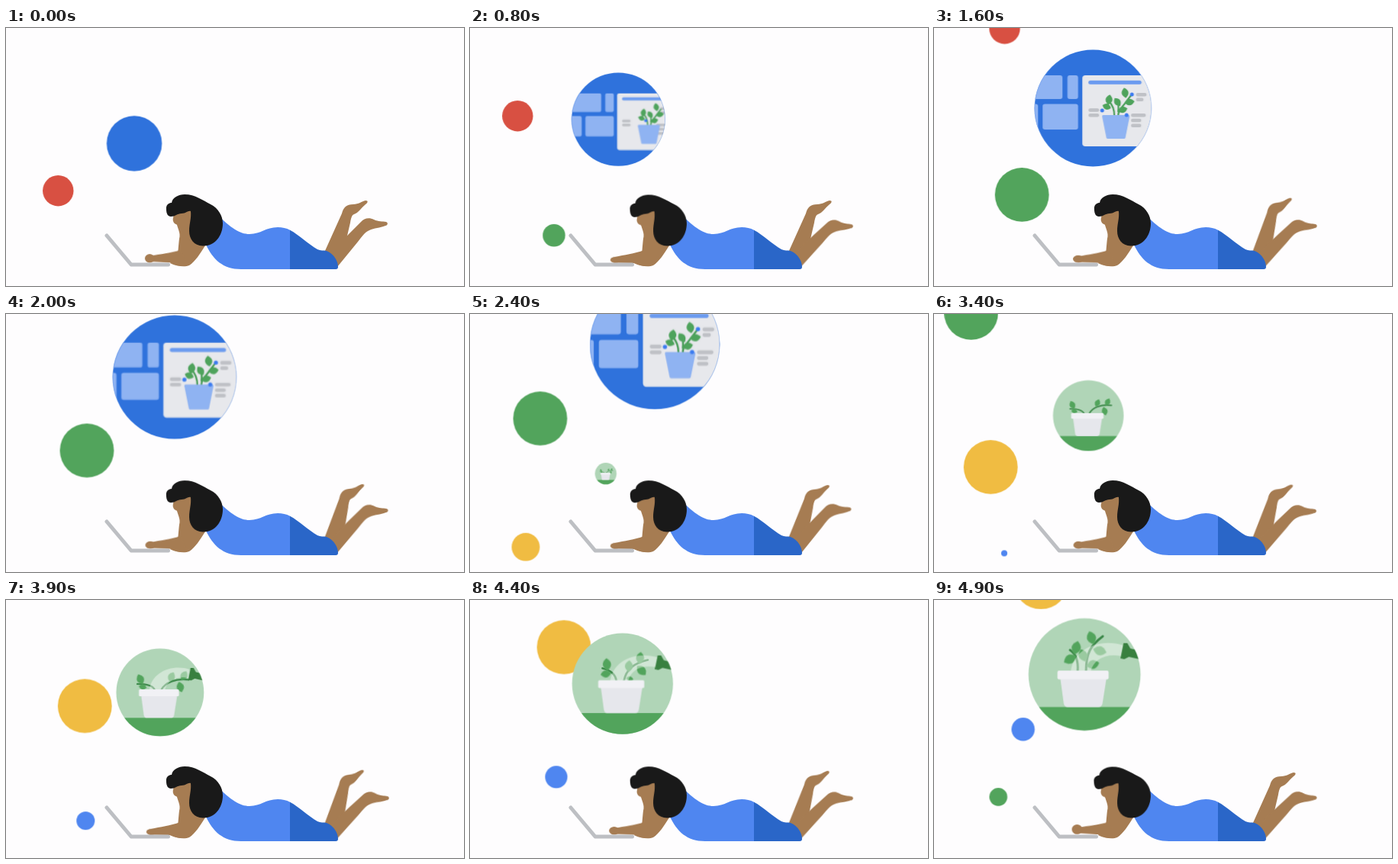
Animation of 600x338 px, one loop 5000 ms. Source, as an HTML page:

```html
<!DOCTYPE html>
<html lang="en">
<head>
<meta charset="utf-8">
<title>Daydreaming at the laptop</title>
<style>
html, body { margin: 0; width: 100%; height: 100%; overflow: hidden; background: #fefdfe; }
svg { display: block; width: 100vw; height: 100vh; }

/* every moving part shares one 5 s clock */
.m { animation: 5s linear infinite; }

/* bubbles: unit circles moved and scaled */
.red { animation-name: red; fill: #d85042; }
.green { animation-name: green; fill: #52a45c; }
.yellow { animation-name: yellow; fill: #f0bc42; }
.blue { animation-name: blue; fill: #4f86f0; }
.last { animation-name: last; fill: #52a45c; }

@keyframes red {
  0% { transform: translate(68.3px, 213.3px) scale(20.2); }
  8% { transform: translate(60.6px, 166px) scale(20.2); }
  12% { transform: translate(59.8px, 141px) scale(20.2); }
  16% { transform: translate(62.3px, 115.4px) scale(20.2); }
  24% { transform: translate(73.8px, 60px) scale(20.2); }
  32% { transform: translate(92.5px, .8px) scale(20.2); }
  36%, 100% { transform: translate(102px, -28px) scale(20.2); }
}
@keyframes green {
  0%, 8% { transform: translate(98px, 288px) scale(0); }
  16% { transform: translate(110px, 271.7px) scale(14.7); }
  24% { transform: translate(117px, 247px) scale(27); }
  32% { transform: translate(115.2px, 218.5px) scale(35.4); }
  40% { transform: translate(106px, 179px) scale(35.4); }
  48% { transform: translate(92px, 137px) scale(35.4); }
  54% { transform: translate(76px, 104px) scale(35.4); }
  60% { transform: translate(61.3px, 67px) scale(35.4); }
  66% { transform: translate(50px, 18px) scale(35.4); }
  72%, 100% { transform: translate(46px, -40px) scale(35.4); }
}
@keyframes yellow {
  0%, 42% { transform: translate(83px, 319px) scale(0); }
  48% { transform: translate(73px, 305.3px) scale(18.4); }
  54% { transform: translate(64px, 279px) scale(29); }
  60% { transform: translate(61.5px, 249px) scale(35.4); }
  66% { transform: translate(69px, 213px) scale(35.4); }
  72% { transform: translate(84.5px, 176px) scale(35.4); }
  78% { transform: translate(103.2px, 139px) scale(35.4); }
  88% { transform: translate(123px, 62px) scale(35.4); }
  98% { transform: translate(140px, -23px) scale(35.4); }
  100% { transform: translate(143px, -41px) scale(35.4); }
}
@keyframes blue {
  0%, 64% { transform: translate(87px, 319px) scale(0); }
  72% { transform: translate(97px, 308px) scale(8); }
  78% { transform: translate(104.3px, 289.3px) scale(12); }
  88% { transform: translate(113px, 232px) scale(14.6); }
  98% { transform: translate(116.7px, 169.5px) scale(15.2); }
  100% { transform: translate(117px, 157px) scale(15.2); }
}
@keyframes last {
  0%, 89% { transform: translate(91px, 274px) scale(0); }
  98% { transform: translate(84.3px, 258px) scale(11.8); }
  100% { transform: translate(83px, 254px) scale(13.5); }
}

/* catalogue bubble */
.shop { animation-name: shop; }
.slide { animation-name: slide; }
.pick { animation-name: pick; }
.dot1 { animation-name: dot1; }
.dot { animation-name: dot; }
@keyframes shop {
  0% { transform: translate(168px, 151.3px) scale(.473); }
  6% { transform: translate(178px, 137px) scale(.62); }
  12% { transform: translate(188px, 124.5px) scale(.745); }
  16% { transform: translate(194.3px, 119.7px) scale(.8); }
  24% { transform: translate(203px, 111px) scale(.925); }
  32% { transform: translate(208.2px, 105px) scale(1); }
  38% { transform: translate(216px, 92px) scale(1.045); }
  43% { transform: translate(228px, 69px) scale(1.08); }
  48% { transform: translate(242px, 40px) scale(1.11); }
  54% { transform: translate(259px, -22px) scale(1.11); }
  60%, 100% { transform: translate(274px, -100px) scale(1.11); }
}
@keyframes slide {
  0%, 3% { transform: translate(45px, 0); opacity: 0; }
  10% { transform: translate(25px, 0); opacity: 1; }
  16% { transform: translate(12px, 0); }
  24% { transform: translate(3px, 0); }
  32%, 100% { transform: translate(0, 0); opacity: 1; }
}
@keyframes pick {
  0%, 8% { transform: translate(24px, 0); }
  16% { transform: translate(8px, 0); }
  24%, 100% { transform: translate(0, 0); }
}
@keyframes dot1 {
  0%, 10% { transform: translate(250px, 107px) scale(0); }
  16% { transform: translate(241px, 107px) scale(1); }
  25%, 100% { transform: translate(220px, 108px) scale(1); }
}
@keyframes dot {
  0%, 18% { transform: var(--at) scale(0); }
  24%, 100% { transform: var(--at) scale(1); }
}

/* watering bubble */
.care { animation-name: care; }
.can { animation-name: can; }
.water { animation-name: water; }
.rise { animation-name: rise; }
.stem1 { animation-name: stem1; }
.stem2 { animation-name: stem2; }
@keyframes care {
  0%, 43% { transform: translate(168px, 228px) scale(0); }
  48% { transform: translate(177.8px, 209.2px) scale(.192); }
  54% { transform: translate(191px, 176px) scale(.34); }
  60% { transform: translate(199.8px, 147.5px) scale(.474); }
  66% { transform: translate(202px, 136px) scale(.59); }
  72% { transform: translate(202.5px, 127px) scale(.71); }
  78% { transform: translate(201.8px, 121px) scale(.782); }
  84% { transform: translate(201px, 114.5px) scale(.855); }
  91% { transform: translate(199px, 106px) scale(.935); }
  98% { transform: translate(197.2px, 97.5px) scale(1); }
  100% { transform: translate(196.5px, 95px) scale(1.01); }
}
@keyframes can {
  0%, 66% { transform: translate(40px, 0); }
  74%, 100% { transform: translate(0, 0); }
}
@keyframes water {
  0%, 73% { opacity: 0; }
  77%, 100% { opacity: .42; }
}
@keyframes rise {
  0%, 81% { transform: var(--a); }
  96%, 100% { transform: var(--b); }
}
@keyframes stem1 {
  0%, 81% { d: path("M-9 -4C-12 -12 -24 -14 -38 -14"); }
  96%, 100% { d: path("M-9 -4C-8 -16 -10 -26 -19 -32"); }
}
@keyframes stem2 {
  0%, 81% { d: path("M2 -4C8 -16 26 -24 48 -21"); }
  96%, 100% { d: path("M2 -4C2 -28 8 -38 24 -50"); }
}

/* woman */
.back { transform-origin: 420px 295px; animation-name: back; }
.front { transform-origin: 430px 300px; animation-name: front; }
.head { transform-origin: 262px 262px; animation-name: head; }
.arm { transform-origin: 235px 304px; animation-name: arm; }
.hand { animation-name: hand; }
@keyframes back {
  0%, 16% { transform: rotate(0deg); }
  8% { transform: rotate(.6deg); }
  24% { transform: rotate(-2.4deg); }
  32% { transform: rotate(-4deg); }
  40% { transform: rotate(-3.7deg); }
  48% { transform: rotate(-2.3deg); }
  54%, 60% { transform: rotate(-1.5deg); }
  70% { transform: rotate(-3.2deg); }
  78% { transform: rotate(-4deg); }
  88% { transform: rotate(-2.4deg); }
  98%, 100% { transform: rotate(0deg); }
}
@keyframes front {
  0% { transform: rotate(0deg); }
  8% { transform: rotate(1.4deg); }
  16% { transform: rotate(2.8deg); }
  24% { transform: rotate(3.2deg); }
  32% { transform: rotate(2.6deg); }
  40% { transform: rotate(.9deg); }
  48% { transform: rotate(-.5deg); }
  60% { transform: rotate(.3deg); }
  70% { transform: rotate(1.8deg); }
  78% { transform: rotate(2.7deg); }
  88% { transform: rotate(2.9deg); }
  98%, 100% { transform: rotate(2.3deg); }
}
@keyframes head {
  0%, 32%, 60%, 78% { transform: rotate(0deg); }
  16%, 98%, 100% { transform: rotate(-1deg); }
  48% { transform: rotate(-.3deg); }
}
@keyframes arm {
  0% { transform: rotate(2deg); }
  8%, 16%, 48%, 78% { transform: rotate(0deg); }
  24%, 40%, 70% { transform: rotate(1.2deg); }
  32% { transform: rotate(1deg); }
  60% { transform: rotate(.5deg); }
  98%, 100% { transform: rotate(2.6deg); }
}
@keyframes hand {
  0% { transform: translate(188.2px, 301.8px) scale(6.3, 5.7); }
  8%, 16%, 48%, 78% { transform: translate(190.3px, 303.8px) scale(6.5, 4); }
  24%, 40%, 70% { transform: translate(189px, 302.7px) scale(6.5, 4.9); }
  32% { transform: translate(188.8px, 302.6px) scale(6.8, 4.8); }
  60% { transform: translate(189.6px, 302.8px) scale(6.6, 4.8); }
  98%, 100% { transform: translate(187.4px, 300.5px) scale(6.8, 6.4); }
}
</style>
</head>
<body>
<svg viewBox="0 0 600 338" preserveAspectRatio="none">
  <defs>
    <clipPath id="lensA"><circle r="76.5"/></clipPath>
    <clipPath id="lensB"><circle r="73.4"/></clipPath>
    <path id="leaf" d="M-9 0Q0 -12 9 0Q0 12 -9 0"/>
  </defs>

  <circle class="m red" r="1"/>
  <circle class="m green" r="1"/>
  <circle class="m yellow" r="1"/>
  <circle class="m blue" r="1"/>
  <circle class="m last" r="1"/>

  <g class="m shop">
    <circle r="76.5" fill="#2f72dc"/>
    <g clip-path="url(#lensA)"><g transform="translate(-208 -105)"><g class="m slide">
      <g fill="#8fb3f2">
        <rect x="118" y="62" width="50" height="31" rx="3"/>
        <rect x="174.5" y="62" width="14" height="31" rx="3"/>
        <rect x="90" y="99.5" width="46" height="33.5" rx="3"/>
        <rect x="142" y="99.5" width="46.5" height="33.5" rx="3"/>
      </g>
      <rect x="194" y="62" width="110" height="93" rx="4" fill="#e7e8ec"/>
      <g fill="none" stroke-linecap="round">
        <path d="M204.5 71.3H269" stroke="#6b9bf0" stroke-width="5"/>
        <path d="M204.3 107.5h9.5M204.3 114.2h9.5M266.5 87.2h9.5M266.5 93.8h5.5M260 114.2h15M260 121h9M260 127.8h9" stroke="#bfc1c6" stroke-width="4.4"/>
      </g>
      <g class="m pick">
        <path d="M236 115C236 106 233 100 229 96M241 115C241 106 247 104 251 97L258 88M241 110C242 104 241 100 241 97" fill="none" stroke="#459b55" stroke-width="2.2"/>
        <g fill="#4ea35c">
          <use href="#leaf" transform="translate(229 94) rotate(-80) scale(.75)"/>
          <use href="#leaf" transform="translate(226 103) rotate(200) scale(.65)"/>
          <use href="#leaf" transform="translate(240 97) rotate(-125) scale(.7)"/>
          <use href="#leaf" transform="translate(250 85) rotate(-100) scale(.75)"/>
          <use href="#leaf" transform="translate(256 97) rotate(-10) scale(.72)"/>
          <use href="#leaf" transform="translate(247 107) rotate(-15) scale(.7)"/>
        </g>
        <path d="M221.500 114H254.500Q256.300 114 256 116L250.500 143.500Q250.200 145 248.500 145H227.500Q225.800 145 225.500 143.500L220 116Q219.700 114 221.500 114Z" fill="#8fb3f2"/>
      </g>
      <g fill="#3b7bf0">
        <circle class="m dot1" r="2.5"/>
        <circle class="m dot" r="2.5" style="--at: translate(259px, 87px)"/>
        <circle class="m dot" r="2.5" style="--at: translate(252px, 114px)"/>
      </g>
    </g></g></g>
  </g>

  <g class="m care">
    <circle r="73.4" fill="#b0d5b7"/>
    <g clip-path="url(#lensB)">
      <rect x="-80" y="42.700" width="160" height="40" fill="#52a45c"/>
      <g fill="none" stroke="#3c8849" stroke-width="3" stroke-linecap="round">
        <path class="m stem1" d="M-9 -4C-12 -12 -24 -14 -38 -14"/>
        <path class="m stem2" d="M2 -4C8 -16 26 -24 48 -21"/>
      </g>
      <g fill="#52a45c">
        <use href="#leaf" class="m rise" style="--a: translate(-33px, -22px) rotate(-115deg) scale(1); --b: translate(-11px, -35px) rotate(-75deg) scale(1)"/>
        <use href="#leaf" class="m rise" style="--a: translate(-29px, -9px) rotate(190deg) scale(.75); --b: translate(-19px, -20px) rotate(152deg) scale(1)"/>
        <use href="#leaf" class="m rise" style="--a: translate(19px, -26px) rotate(-65deg) scale(.95); --b: translate(-2px, -25px) rotate(-110deg) scale(.95)"/>
        <use href="#leaf" class="m rise" style="--a: translate(40px, -28px) rotate(-62deg) scale(.95); --b: translate(9px, -48px) rotate(-108deg) scale(1)"/>
        <use href="#leaf" class="m rise" style="--a: translate(34px, -9px) rotate(75deg) scale(1); --b: translate(20px, -31px) rotate(15deg) scale(1)"/>
        <use href="#leaf" class="m rise" style="--a: translate(10px, -2px) rotate(40deg) scale(.3); --b: translate(11px, -13px) rotate(-15deg) scale(.95)"/>
      </g>
      <path class="m water" d="M51 -38C20 -48 -14 -34 -18 -4H8C12 -20 28 -28 48 -24Z" fill="#fff"/>
      <path class="m can" d="M51 -41H56L60 -34L76 -30V-19L58 -23L52 -20L47 -21Z" fill="#38803f"/>
      <path d="M-32 3H29L23.500 38Q22.700 42.700 18 42.700H-22Q-26.500 42.700 -27.300 38Z" fill="#e6e7ec"/>
      <rect x="-35.500" y="-5" width="67" height="11.500" rx="2" fill="#f1f1f5"/>
    </g>
  </g>

  <g fill="#a67c52">
    <path class="m back" d="M417 294L440 243C442 235 446 231 455 231C462 231 466 227 471 226C475 226 474 229 471 231C464 237 462 242 456 244C453 245 452 249 451 255L444 285L436 302Z"/>
    <path class="m front" d="M426 294L449 270L465 254C469 249 476 248 482 251C488 254 493 253 498 254C501 255 500 259 497 259C490 262 482 262 476 265C469 268 466 274 461 280L434 313Z"/>
  </g>
  <path d="M276 244C295 262 306 270 319 270C334 270 340 261 356 261C362 261 367 262 372.500 265V316H308C284 316 271 303 262 284Z" fill="#4f86f0"/>
  <path d="M372 264.700C384 271 396 283 408 290C412 292 416 291 420 292C430 296 435 306 435 313Q435 316 432 316H372Z" fill="#2a66c8"/>
  <g fill="#a67c52">
    <path d="M223 254C225 264 229 268 227 276C226 284 226 288 225 296L215 308C225 313 235 313 240 311C248 306 254 296 263 282L250 250Z"/>
    <path class="m arm" d="M228 291C215 296 202 297 190 300L188 307.500L215 308C225 313 233 312 238 311Z"/>
    <circle class="m hand" r="1"/>
  </g>
  <g class="m head">
    <path d="M219.500 243C220 247 218 250 219 253C220 257 224 258 228 258L244 266V238Z" fill="#a67c52"/>
    <path d="M210 238C209 231 214 229 217 229C218 222 226 218 234 218C248 218 258 226 268 231C278 236 284 246 284 256C284 272 274 285.500 258 285.500C246 285.500 240 276 240 266C240 256 243 250 242 240C238 239 236 243 230 243C224 243 222 247 216 247C212 247 210 243 210 238Z" fill="#191919"/>
  </g>
  <path d="M132 272L164 310H212.500" fill="none" stroke="#bdbfc3" stroke-width="5" stroke-linecap="round" stroke-linejoin="round"/>
</svg>
</body>
</html>
```
